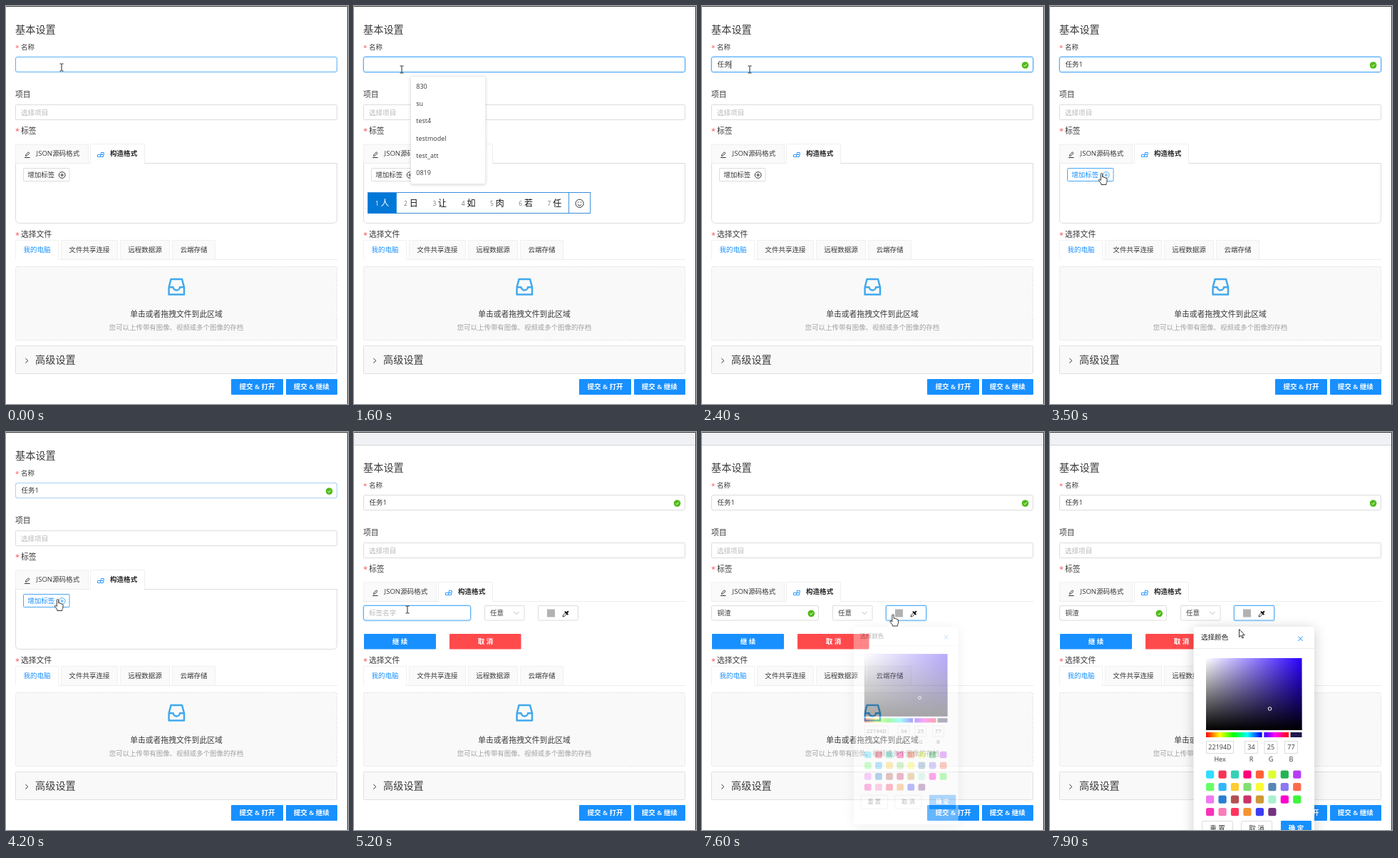
Recreate the animation shown at these times as an HTML page. Size 480x558 px, loop 8 s.

```html
<!DOCTYPE html>
<html lang="zh-CN">
<head>
<meta charset="utf-8">
<title>新建任务</title>
<style>
html, body { margin: 0; width: 100%; height: 100%; overflow: hidden; background: #fff; }
svg { display: block; width: 480px; height: 558px; }
text { font: 9.55px "Open Sans", "Noto Sans CJK SC", sans-serif; fill: #3a3a3a; white-space: pre; }
.h1 { font-size: 14.2px; }
.h2 { font-size: 10.8px; }
.hint { fill: #b8b8b8; }
.note { font-size: 9.43px; fill: #a0a0a0; }
.star { fill: #ff4d4f; }
.bold { font-weight: 600; fill: #222; }
.mid { text-anchor: middle; }
.light { fill: #fff; font-weight: 600; }
.small { font-size: 9px; }
.box { fill: #fff; stroke: #dcdcdc; }
.box.hot { stroke: #5ab0f5; }
.glow { fill: none; stroke: #1890ff; stroke-opacity: .24; stroke-width: 3; }
.fading { fill: none; stroke: #a9d2f3; }
.tab { fill: #fafafa; stroke: #f0f0f0; }
.tab.on { fill: #fff; }
.rule { fill: none; stroke: #ececec; }
.pane { fill: #f9f9f9; stroke: #e0e0e0; }
.blue { fill: #1890ff; }
.red { fill: #ff4a4c; }
.line { fill: none; stroke: #333; }
.accent { fill: none; stroke: #1890ff; }
#add.hot .box, #add.hot .line { stroke: #4aa6f2; }
#add.hot text { fill: #1890ff; }
.num { font-size: 8.5px; fill: #777; }
.word { font-size: 12px; fill: #111; }
.pick { fill: #fff; }
#popup { filter: drop-shadow(0 3px 9px rgba(0, 0, 0, .2)); }
</style>
</head>
<body>
<svg viewBox="0 0 480 558">
  <defs>
    <linearGradient id="white"><stop stop-color="#fff"/><stop offset="1" stop-color="#fff" stop-opacity="0"/></linearGradient>
    <linearGradient id="black" x2="0" y2="1"><stop stop-opacity="0"/><stop offset="1"/></linearGradient>
    <linearGradient id="hues"></linearGradient>
    <g id="tick">
      <circle r="4.8" fill="#4fbb16"/>
      <path d="M-2.1 .1L-.5 1.7 2.2-1.5" fill="none" stroke="#fff"/>
    </g>
  </defs>

  <rect width="480" height="558" fill="#fff"/>
  <g data-on="4300-8000">
    <rect y="1" width="479" height="17" fill="#f0f1f5"/>
    <path d="M0 18.5H479" stroke="#d3d5dc"/>
  </g>
  <path d="M0 .5H479.5V558" fill="none" stroke="#3c3c3c"/>

  <g id="top">
    <text class="h1" x="13" y="38.2">基本设置</text>
    <text class="star" x="13" y="62">*</text>
    <text x="21" y="61.4">名称</text>
    <rect class="glow" data-on="900-4100" x="13.5" y="71.5" width="451" height="21" rx="3"/>
    <rect class="box" data-hot="0-4100" x="13.5" y="71.5" width="451" height="21" rx="2.5"/>
    <rect class="fading" data-on="4100-4400" x="13.5" y="71.5" width="451" height="21" rx="2.5"/>
    <g id="name" transform="translate(21.5 85.4)"><text></text><path class="line" stroke-dasharray="1 1"/><path class="line caret"/></g>
    <use href="#tick" x="453.6" y="83" data-on="1700-8000"/>
    <text class="h2" x="13" y="128">项目</text>
    <rect class="box" x="13.5" y="138.5" width="451" height="21" rx="1"/>
    <text class="hint" x="21" y="152.6">选择项目</text>
    <text class="star h2" x="13" y="179">*</text>
    <text class="h2" x="21" y="178.5">标签</text>
    <rect class="tab" x="13.5" y="194" width="102" height="26.5"/>
    <path class="rule" d="M13 220.5H465"/>
    <path class="tab on" d="M118.5 221.5V193.5H194.5V221.5"/>
    <path d="M26 212.5H33.5M27.5 210.3L28 208.4 31.4 204.8 33 206.4 29.5 209.8Z" class="line"/>
    <text x="42.6" y="210.4">JSON源码格式</text>
    <path class="accent" stroke-width=".9" d="M128.5 208.5h4v3h-4zM132.5 208.5h4v3h-4M133.3 208.5v-3h4v3"/>
    <text class="bold" x="146" y="210.4">构造格式</text>
  </g>

  <g data-on="0-4300">
    <path class="line" style="stroke:#dcdcdc" d="M194.5 220.5H464.5V298.5Q464.5 304.5 458.5 304.5H19.5Q13.5 304.5 13.5 298.5V220.5"/>
    <g id="add" data-hot="3400-4300">
      <rect class="box" x="24.5" y="227.5" width="64.5" height="18" rx="1"/>
      <text x="30.2" y="240.4">增加标签</text>
      <g class="line"><circle cx="78.7" cy="237" r="4.4"/><path d="M76.3 237h4.8M78.7 234.6v4.8"/></g>
    </g>
  </g>

  <g data-on="4300-8000">
    <rect class="glow" data-on="5200-7500" x="13.5" y="243.5" width="150" height="20.5" rx="3"/>
    <rect class="box" data-hot="5200-7500" x="13.5" y="243.5" width="150" height="20.5" rx="2.5"/>
    <text class="hint" data-on="4300-5400" x="21" y="257">标签名字</text>
    <g id="label" transform="translate(21.5 257)"><text></text><path class="line" stroke-dasharray="1 1"/><path class="line caret"/></g>
    <use href="#tick" x="153.3" y="254.5" data-on="5400-8000"/>
    <rect class="box" x="183.5" y="243.5" width="55.5" height="20.5" rx="1.5"/>
    <text x="191" y="257">任意</text>
    <path class="line" style="stroke:#bbb" d="M224.5 252L228 255.6 231.5 252"/>
    <rect class="glow" data-on="7500-8000" x="258.5" y="243.5" width="56" height="20.5" rx="2"/>
    <rect class="box" data-hot="7400-8000" x="258.5" y="243.5" width="56" height="20.5" rx="1.5"/>
    <rect x="271" y="248.5" width="11" height="11" fill="#b2b2b2"/>
    <path d="M293 259L293.4 257 297 253.2 298.8 255 295 258.6Z" class="line"/>
    <path d="M296.5 252.2L299.8 255.5M298.6 253.4L300.3 251.7" stroke="#111" stroke-width="2" stroke-linecap="round"/>
    <rect class="blue" x="14" y="283" width="101" height="21.5" rx="1"/>
    <text class="light mid" x="64.5" y="297.2">继 续</text>
    <rect class="red" x="134" y="283" width="100.5" height="21.5" rx="1"/>
    <text class="light mid" x="184.5" y="297.2">取 消</text>
  </g>

  <text class="star h2" x="13" y="325">*</text>
  <text class="h2" x="21" y="324.4">选择文件</text>
  <g id="sources"></g>
  <path class="rule" d="M74 355.5H465"/>

  <rect class="pane" x="13.5" y="365.5" width="451" height="103" rx="1" stroke-dasharray="2 1.6"/>
  <path d="M228.6 394.2L231.6 382.9H247L250 394.2V404.6H228.6V394.2H234.6a4.7 4.2 0 0 0 9.4 0H250" fill="none" stroke="#40a9ee" stroke-width="2.5" stroke-linejoin="round"/>
  <text class="h2 mid" x="239" y="435.8">单击或者拖拽文件到此区域</text>
  <text class="note mid" x="239" y="453.6">您可以上传带有图像、视频或多个图像的存档</text>

  <rect class="pane" x="13.5" y="476.5" width="451" height="39" rx="1"/>
  <path class="line" d="M27.3 494L30.8 497.3 27.3 500.6"/>
  <text class="h1" x="41" y="501.2">高级设置</text>

  <rect class="blue" x="316" y="523" width="73" height="22" rx="1"/>
  <text class="light mid" x="352.5" y="537.3">提交 &amp; 打开</text>
  <rect class="blue" x="393" y="523" width="72" height="22" rx="1"/>
  <text class="light mid" x="428.8" y="537.3">提交 &amp; 继续</text>

  <g id="history" data-on="1000-1700">
    <rect x="79.5" y="98.5" width="105" height="151" rx="2" fill="#fff" stroke="#e6e6e6" stroke-width=".8" style="filter:drop-shadow(0 1px 2px rgba(0,0,0,.15))"/>
  </g>

  <g id="ime"></g>

  <g id="popup">
    <rect x="201.5" y="273" width="169.5" height="320" rx="2" fill="#fff"/>
    <text class="bold" x="212" y="291.2" style="font-weight:500">选择颜色</text>
    <path class="accent" d="M348.3 286.6l6.4 6.4m0-6.4l-6.4 6.4"/>
    <path class="rule" d="M202 303.5H371"/>
    <g transform="translate(219 317)">
      <rect width="134.5" height="101" fill="#2b00ff"/>
      <rect width="134.5" height="101" fill="url(#white)"/>
      <rect width="134.5" height="101" fill="url(#black)"/>
      <circle cx="89.5" cy="71" r="2.3" fill="none" stroke="#fff"/>
    </g>
    <rect x="219" y="421" width="116" height="7" fill="url(#hues)"/>
    <rect x="297.6" y="421" width="2.8" height="7" fill="#fff"/>
    <rect x="337.5" y="421" width="16" height="7" fill="#22194d"/>
    <g id="fields"></g>
    <g id="swatches"></g>
    <rect class="box" x="213.5" y="545.5" width="43" height="22" rx="1"/>
    <text class="mid" x="235" y="559">重 置</text>
    <rect class="box" x="268.5" y="545.5" width="43" height="22" rx="1"/>
    <text class="mid" x="290" y="559">取 消</text>
    <rect class="blue" x="324" y="545" width="43" height="23" rx="1"/>
    <text class="light mid" x="345.5" y="559">确 定</text>
  </g>

  <g id="cursor">
    <path id="beam" d="M-2.5-5H-.5L0-4.5 .5-5H2.5M0-4.5V4.5M-2.5 5H-.5L0 4.5 .5 5H2.5" fill="none" stroke="#222"/>
    <path id="arrow" d="M0 0V11L2.6 8.8 4.4 12.6 6 11.9 4.3 8.2H7.7Z" fill="#fff" stroke="#222" stroke-width=".9"/>
    <path id="hand" d="M-1.2 1Q-1.2 0 0 0T1.2 1V5.4Q3.4 4.5 3.6 6 5.2 5.1 5.7 6.8 7.4 6.2 7.5 8V11.5Q7.4 13 6.4 14.4V16H-.6V14.5L-3.8 10.3Q-4.5 8.6-3.2 8.4L-1.2 10Z" fill="#fff" stroke="#222" stroke-width=".9"/>
  </g>
</svg>

<script>
const LOOP = 8000, STEP = 100;
const $ = id => document.getElementById(id);
const text = (x, y, str, cls = '') => `<text x="${x}" y="${y}" class="${cls}">${str}</text>`;
const fill = (id, items, draw) => $(id).insertAdjacentHTML('beforeend', items.map(draw).join(''));

fill('hues', [0, 60, 120, 180, 240, 300, 360], h =>
  `<stop offset="${h / 360}" stop-color="hsl(${h},100%,50%)"/>`);

fill('sources', [[13, 61, '我的电脑'], [77, 80, '文件共享连接'], [160, 70, '远程数据源'], [233, 61, '云端存储']],
  ([x, w, str], i) =>
    `<path class="tab ${i ? '' : 'on'}" d="M${x + .5} 355.5V328.5H${x + w - .5}V355.5"/>` +
    text(x + w / 2, 345.4, str, i ? 'mid' : 'mid blue'));

fill('history', ['830', 'su', 'test4', 'testmodel', 'test_att', '0819'],
  (str, i) => text(87.3, 115.7 + i * 24.3, str, 'small'));

fill('fields', [[219, 39, '22194D', 'Hex'], [273, 19, '34', 'R'], [300.5, 19, '25', 'G'], [329, 19, '77', 'B']],
  ([x, w, value, name]) =>
    `<rect class="box" x="${x + .5}" y="433.5" width="${w - 1}" height="17"/>` +
    text(x + w / 2, 445.2, value, 'mid small') + text(x + w / 2, 461.8, name, 'mid small'));

const palette = '33ddff f53355 34d1b7 ff007c ff6037 ddff33 24b353 b83df5 ' +
  '66ff66 32b7fa ffcc33 83e070 fafa37 5986b3 8c78f0 ff6a4d ' +
  'f078f0 2a7dd1 b25050 cc3366 cc9933 aaf0d1 ff00cc 3df53d ' +
  'fa32b7 fa7dbb ff355e f59331 3d3df5 733380';
fill('swatches', palette.split(' '), (c, i) =>
  `<rect x="${219 + i % 8 * 17.45}" y="${474.5 + (i >> 3) * 17.5}" width="11.2" height="11.2" rx="2.5" fill="#${c}"/>`);

// [time, typed text, input method candidates]
const nameTyping = [
  [0, ''], [1600, '', '人 日 让 如 肉 若 任'], [1700, 're', '热 人 惹 任 认 仁 忍'],
  [1800, 'ren', '人 任 认 仁 忍 韧 刃'], [1900, "ren'wu", '任务 人物 人 任 认 仁 忍'],
  [2000, '任务'], [2600, '任务1']
];
const labelTyping = [
  [0, ''], [5400, 't', '他 她 它 天 听 同 太'], [5500, 'to', '头 偷 投 透 通 同 痛'],
  [5600, 'ton', '通 同 桶 痛 统 童 铜'], [5700, 'tong', '通 同 痛 桶 铜 统 童'],
  [5900, "tong'z", '同族 通知 通 同 桶 痛 铜'], [6000, "tong'zh", '通知 同志 通 同 桶 痛 铜'],
  [6100, "tong'zha", '铜渣 桶炸 通 同 桶 痛 铜'], [6200, '铜渣']
];
// [time, shape, x, y]
const pointer = [
  [0, 'beam', 78, 86], [100, 'beam', 70, 88], [200, 'beam', 68, 89], [600, 'beam', 67, 89],
  [3000, 'arrow', 69, 128], [3100, 'arrow', 72, 200], [3200, 'hand', 72.5, 234.5],
  [4300, 'arrow', 71, 234.5], [4800, 'beam', 75, 244], [4900, 'beam', 75, 249],
  [7100, 'beam', 96, 250], [7200, 'arrow', 170, 252], [7300, 'hand', 230, 254],
  [7400, 'hand', 268, 256], [7700, 'arrow', 265.5, 276.5]
];

const within = (spec, t) => spec.split(' ').some(r => {
  const [from, to] = r.split('-').map(Number);
  return t >= from && t < to;
});
const latest = (list, t) => list.filter(e => e[0] <= t).pop();

function drawField(id, typing, t, blink) {
  const [, str, words] = latest(typing, t);
  const [label, underline, caret] = $(id).children;
  label.textContent = str;
  const w = str ? label.getComputedTextLength() : 0;
  underline.setAttribute('d', words && str ? `M0 2.5H${w}` : '');
  caret.setAttribute('d', within(blink, t) ? `M${Math.round(w)} -9V2.5` : '');
  return words;
}

function drawIme(words) {
  if (!words) return '';
  const left = 19.5;
  let x = left, cells = '';
  words.split(' ').forEach((word, i) => {
    const w = 28.3 + 12 * word.length, cls = i ? '' : ' pick';
    if (!i) cells += `<rect x="${x}" y="262" width="${w}" height="29" fill="#0078d7"/>`;
    cells += text(x + 10.3, 280.2, i + 1, 'num' + cls) + text(x + 18, 281.2, word, 'word' + cls);
    x += w;
  });
  return `<rect x="${left}" y="261.5" width="${x + 30 - left}" height="29" fill="#fff" stroke="#3c8ddb"/>${cells}
    <path d="M${x} 262V291" stroke="#3c8ddb"/>
    <g transform="translate(${x + 15} 276.8)" class="line">
      <circle r="5.6"/><path d="M-2.8 1.3Q0 4.8 2.8 1.3M-2-2.4v1.4M2-2.4v1.4"/></g>`;
}

const timed = [...document.querySelectorAll('[data-on]')];
const hot = [...document.querySelectorAll('[data-hot]')];

function draw(t) {
  timed.forEach(el => el.style.display = within(el.dataset.on, t) ? '' : 'none');
  hot.forEach(el => el.classList.toggle('hot', within(el.dataset.hot, t)));
  $('top').setAttribute('transform', `translate(0 ${t < 4300 ? 0 : 17})`);

  const words = [
    drawField('name', nameTyping, t, '1700-3100 3600-4100'),
    drawField('label', labelTyping, t, '5400-6800 7300-7500')
  ];
  $('ime').innerHTML = drawIme(words[0] || words[1]);

  const open = Math.min(1, Math.max(0, (t - 7500) / 300));
  $('popup').style.display = open ? '' : 'none';
  $('popup').style.opacity = open;
  $('popup').setAttribute('transform', `translate(286 273) scale(${.8 + .2 * open}) translate(-286 -273)`);

  const [, shape, x, y] = latest(pointer, t);
  $('cursor').setAttribute('transform', `translate(${x} ${y})`);
  for (const el of $('cursor').children) el.style.display = el.id === shape ? '' : 'none';
}

const start = performance.now();
let shown = -1;
function tick() {
  const t = Math.floor((performance.now() - start) % LOOP / STEP) * STEP;
  if (t !== shown) draw(shown = t);
  requestAnimationFrame(tick);
}
tick();
</script>
</body>
</html>
```
